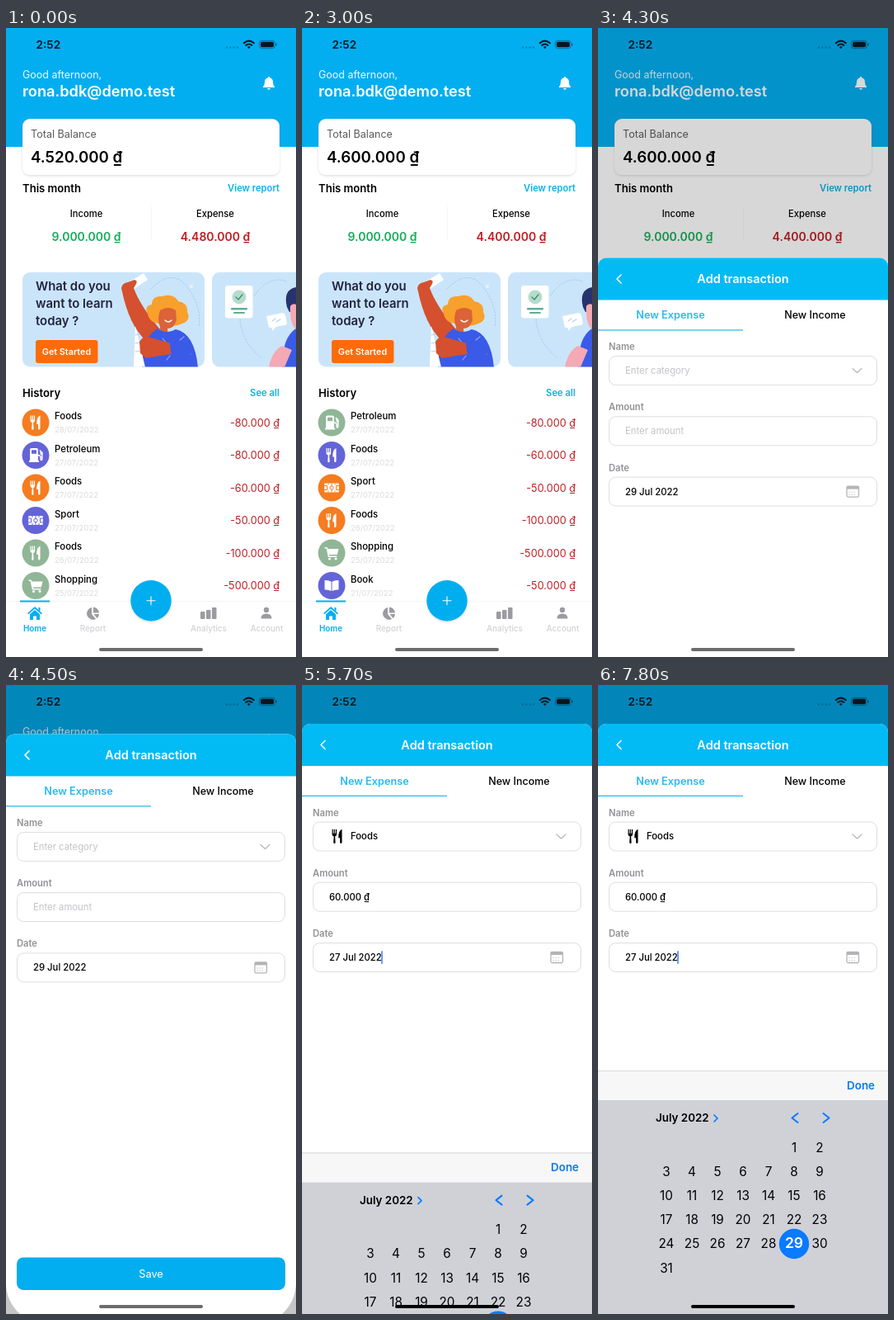
An HTML page for the animation above (8 s loop, 352x762 px).

```html
<!DOCTYPE html>
<html lang="en">
<head>
<meta charset="utf-8">
<title>Expense tracker</title>
<style>
  html, body { margin: 0; width: 100%; height: 100%; overflow: hidden; background: #fff; }
  svg { display: block; width: 352px; height: 762px; font-family: Inter, Roboto, sans-serif; }
</style>
</head>
<body>
<svg id="stage" viewBox="0 0 352 762" xmlns="http://www.w3.org/2000/svg">
  <defs>
    <filter id="soft" x="-30%" y="-30%" width="160%" height="170%">
      <feDropShadow dx="0" dy="1.2" stdDeviation="1.5" flood-opacity=".14"/>
    </filter>
    <clipPath id="card1"><rect x="20" y="296" width="221" height="114.500" rx="9"/></clipPath>
    <clipPath id="card2"><rect x="250" y="296" width="221" height="114.500" rx="9"/></clipPath>

    <!-- icons are centred on 0,0 and take the current colour -->
    <g id="food" fill="currentColor">
      <path d="M-6.500-8.500h1.200v5h1v-5h1.200v5h1v-5h1.200v6q0 2-2 2.600l.5 7.200q0 1.500-1.200 1.500t-1.200-1.500l.5-7.200q-2.200-.6-2.200-2.600z"/>
      <path d="M5.500-8.500V7.200q0 1.400-1.200 1.400T3.100 7.200V2H1.200Q1-7 5.500-8.500z"/>
    </g>
    <g id="fuel" fill="currentColor">
      <path fill-rule="evenodd" d="M-7-6.500q0-2 2-2h6q2 0 2 2V6.500h1v2H-8v-2h1zM-5-6.300v4.600H1v-4.600z"/>
      <path d="M3 0q3 0 3 2.500V5q0 1 .9 1t.9-1V-2.500L5-6" fill="none" stroke="currentColor" stroke-width="1.500"/>
      <rect x="5.500" y="-4.500" width="2.800" height="4" rx="1"/>
    </g>
    <g id="sport">
      <rect x="-8.800" y="-5.500" width="17.600" height="11" rx="1" fill="currentColor"/>
      <g fill="none" stroke="var(--hole)" stroke-width="1">
        <path d="M0-5.500v3.300M0 2.200v3.300M-8.800-2.500h3.300v5h-3.300M8.800-2.500H5.500v5h3.300"/>
        <circle r="2.200"/>
        <path d="M-4-5.500v2M4-5.500v2M-4 5.500v-2M4 5.500v-2"/>
      </g>
    </g>
    <g id="cart" fill="currentColor">
      <path d="M-8.500-7h3l.7 2H8.500L6.800 2H-3l.3 1.500h9V5h-10.500L-6.500-5.500h-2z"/>
      <circle cx="-2.500" cy="7" r="1.600"/><circle cx="5" cy="7" r="1.600"/>
    </g>
    <g id="book" fill="currentColor">
      <path d="M-.5-4.800Q-4-7-8.500-6.500v11.500q4.500-.3 8 1.500zM.5-4.800Q4-7 8.500-6.500v11.500q-4.500-.3-8 1.500z"/>
    </g>
  </defs>

  <g id="home"></g>
  <rect id="dim" width="352" height="762" opacity="0"/>
  <g id="sheet"></g>
  <g id="picker"></g>
  <g id="status"></g>
  <rect id="bar" x="113" y="751" width="126" height="4" rx="2"/>
</svg>

<script>
const $ = id => document.getElementById(id);
const BLUE = '#03aef0', LINK = '#0fb0e6', IOS = '#0a7aff', RED = '#be1e22';

const text = (x, y, s, size, fill = '#000', weight = 400, anchor = 'start') =>
  `<text x="${x}" y="${y}" font-size="${size}" fill="${fill}" font-weight="${weight}" text-anchor="${anchor}">${s}</text>`;
const mid = (x, y, s, size, fill, weight) => text(x, y, s, size, fill, weight, 'middle');
const end = (x, y, s, size, fill, weight) => text(x, y, s, size, fill, weight, 'end');
const rect = (x, y, w, h, fill, rx = 0, extra = '') =>
  `<rect x="${x}" y="${y}" width="${w}" height="${h}" fill="${fill}" rx="${rx}" ${extra}/>`;
const path = (d, fill, extra = '') => `<path d="${d}" fill="${fill}" ${extra}/>`;
const line = (d, stroke, width = 1.5, extra = '') =>
  path(d, 'none', `stroke="${stroke}" stroke-width="${width}" stroke-linecap="round" stroke-linejoin="round" ${extra}`);
const circle = (x, y, r, fill, extra = '') => `<circle cx="${x}" cy="${y}" r="${r}" fill="${fill}" ${extra}/>`;
const icon = (id, x, y, color, hole = '#000') =>
  `<use href="#${id}" x="${x}" y="${y}" style="color:${color};--hole:${hole}"/>`;

// ---- history rows ----
const ROW_Y = 458.3, ROW_H = 39.5;
const ORANGE = '#f57c20', PURPLE = '#6464d9', GREEN = '#90b697';
const before = [
  ['food', 'Foods', '28', 80, ORANGE], ['fuel', 'Petroleum', '27', 80, PURPLE],
  ['food', 'Foods', '27', 60, ORANGE], ['sport', 'Sport', '27', 50, PURPLE],
  ['food', 'Foods', '26', 100, GREEN], ['cart', 'Shopping', '25', 500, GREEN]
];
const after = [
  ['fuel', 'Petroleum', '27', 80, GREEN], ['food', 'Foods', '27', 60, PURPLE],
  ['sport', 'Sport', '27', 50, ORANGE], ['food', 'Foods', '26', 100, ORANGE],
  ['cart', 'Shopping', '25', 500, GREEN], ['book', 'Book', '21', 50, PURPLE]
];
const row = ([kind, name, day, sum, color], i, list) => {
  const y = ROW_Y + i * ROW_H;
  return `<g id="${list}${i}">` + circle(36, y + 19.7, 16.5, color) + icon(kind, 36, y + 19.7, '#fff', color) +
    text(59, y + 15.8, name, 11.4, '#000', 500) + text(59, y + 31.7, day + '/07/2022', 9.6, '#dcdcde') +
    end(332, y + 24.6, `-${sum}.000 ₫`, 12.7, RED) + '</g>';
};
const state = (id, rows, balance, expense) => `<g id="${id}">` +
  text(30, 163, balance + ' ₫', 18.7, '#000', 600) +
  mid(254, 258, expense + ' ₫', 14, RED, 600) +
  rows.map((r, i) => row(r, i, id)).join('') + '</g>';

// ---- banners ----
const SKIN = '#d4502f', SHIRT = '#3a5ae8', SKY = '#cae5fa', DASH = '#9cc4ea';
const learnBanner = `<g clip-path="url(#card1)">` +
  rect(20, 296, 221, 115, SKY) +
  line('M176 316q26-26 44-2t14 48', DASH, .8, 'stroke-dasharray="2 2"') +
  circle(225, 313, 2, '#e6f3fd') +
  path('M141 313l26-16 5 8-26 17z', '#fff') +
  path('M140 315q1-6 8-7l8-3q4 1 2 5l-3 5q8 22 32 50l-12 18q-22-16-32-55z', SKIN) +
  path('M172 346q-5-9 5-11 0-11 13-10 13-4 19 6 12 2 11 13 5 10-6 14-12 6-20 0-20 2-22-12z', '#f8a02c') +
  path('M187 342q10-6 19 0l1 12q-3 10-11 10l1 10h-11l1-12q-4-8 0-20z', '#dc6238') +
  line('M193 354q4 4 8 0', '#fff', 1.3) +
  path('M165 411q0-36 19-47 11 8 22 1 23 5 27 46z', SHIRT) +
  line('M190 376l4 5M211 378l5-4M219 392l5 3M199 397l-4 5M207 388l4-4', '#8da3ff', 1.2) +
  path('M157 361l12 50h-14z', '#fff') +
  line('M157 372l4-1M157 382l6-1M157 392l9-1', '#a9bfdc', .8) +
  path('M162 380q4-7 10-6l28 8q7 8 0 13l-30 5-7-6z', SKIN) +
  path('M199 382q18-3 24 8t-22 8z', SHIRT) +
  ['What do you', 'want to learn', 'today ?'].map((s, i) => text(36, 317.5 + 21.3 * i, s, 14.9, '#22223f', 600)).join('') +
  rect(36, 378, 75.5, 28, '#ff6b08', 3) + mid(73.5, 396, 'Get Started', 10.8, '#fff', 600) + '</g>';

const nextBanner = `<g clip-path="url(#card2)">` +
  rect(250, 296, 221, 115, SKY) +
  line('M301 325q18-26 40-18M284 353q3 30 27 47', DASH, .8, 'stroke-dasharray="2 2"') +
  rect(266, 312, 33.5, 39.5, '#fff', 3) + circle(283, 326, 8.5, '#b6dccb') +
  line('M279 326l3 3 5-6', '#3a9277', 1.4) + rect(273, 339, 20, 2.5, '#5fae93', 1) + rect(276, 344, 14, 2, '#5fae93', 1) +
  path('M316 349l20-4q2 0 3 3l2 9q0 3-3 3l-10 2-5 5v-4l-4 0z', '#fff') +
  line('M323 355l4-3M328 356l5-3', DASH, 1) +
  path('M341 338q-5-21 11-24v30h-8z', '#26336e') +
  path('M345 337q3-4 7-2v30q-8-6-7-28z', '#f4a9b4') +
  path('M335 411q0-36 17-47v47z', SHIRT) +
  path('M319 411q4-20 16-26l12 5-9 21z', '#f4a9b4') + '</g>';

// ---- tab bar ----
const tab = (x, label, on) => mid(x, 730.8, label, 9.9, on ? BLUE : '#d2d2d6', on ? 600 : 500);
const tabs = rect(0, 694, 352, 68, '#fff') + rect(0, 694, 352, .6, '#efeff0') + rect(17, 693.5, 36, 2, BLUE) +
  path('M35 701l9 8-1.200 1.300L35 703.500l-7.800 6.800L26 709zM29 710.300l6-5.200 6 5.200V717h-4v-4.500h-4V717h-4z', BLUE) +
  rect(39.5, 702, 2, 4, BLUE) +
  path('M104 702v8l5 6a7.500 7.500 0 1 1-5-14z', '#9b9ba0') +
  path('M106 701.500a7.500 7.500 0 0 1 7 7h-7zM106.500 710h6.500a7 7 0 0 1-2.500 5z', '#9b9ba0') +
  [[236, 9], [243, 11], [250, 14]].map(([x, h]) => rect(x, 716 - h, 5.5, h, '#9b9ba0', 1)).join('') +
  circle(316, 705, 3.2, '#9b9ba0') + path('M309.500 715.500q0-6 6.500-6t6.500 6z', '#9b9ba0') +
  tab(35, 'Home', true) + tab(105.5, 'Report') + tab(246, 'Analytics') + tab(316.5, 'Account') +
  circle(176, 693.8, 24.7, BLUE, 'filter="url(#soft)"') + line('M171 693.800h10M176 688.800v10', '#fff', 1.1);

$('home').innerHTML = rect(0, 0, 352, 762, '#fff') + rect(0, 0, 352, 144, BLUE) +
  text(20, 61.3, 'Good afternoon,', 12.5, '#e9f8ff') +
  text(20, 83.2, 'rona.bdk@demo.test', 18.2, '#fff', 600) +
  path('M319 59q1.200 0 1.200 1.200 3.800 1 3.800 5.300 0 4 2 5.500v1h-14v-1q2-1.500 2-5.500 0-4.300 3.800-5.300Q317.800 59 319 59zM317 73h4q-.3 1.800-2 1.800T317 73z', '#fff') +
  rect(20, 110, 312, 68, '#fff', 9, 'filter="url(#soft)"') +
  text(30, 132.6, 'Total Balance', 12.6, '#5a5a5c') +
  text(20, 199, 'This month', 13.1, '#000', 600) + end(332, 198.3, 'View report', 11.2, LINK, 600) +
  rect(176, 216, .8, 42, '#f4f4f5') +
  mid(97.5, 229, 'Income', 11.2, '#000', 500) + mid(254, 229, 'Expense', 11.2, '#000', 500) +
  mid(97.5, 258, '9.000.000 ₫', 14, '#17ac58', 600) +
  learnBanner + nextBanner +
  text(20, 446.6, 'History', 13.2, '#000', 600) + end(332, 446, 'See all', 11.3, LINK, 600) +
  state('a', before, '4.520.000', '4.480.000') + state('b', after, '4.600.000', '4.400.000') +
  `<g id="actions"><g id="edit">${rect(0, 0, 130, ROW_H, '#c6c6cb')}${mid(30.5, 24.2, 'Edit', 12.3, '#fff', 500)}</g>` +
  `<g id="del">${rect(0, 0, 70, ROW_H, '#ff3b30')}${mid(30.5, 24.2, 'Delete', 12.1, '#fff', 500)}</g></g>` +
  tabs;

// ---- add transaction sheet ----
const field = (y, label) => text(13, y - 7, label, 11.2, '#929297', 600) +
  rect(13.5, y + .5, 325, 35, '#fff', 8, 'stroke="#dddde0"');
const value = (y, s, x = 33) => text(x, y, s, 11.3, '#000', 500);
const hint = (y, s) => text(33, y, s, 11.3, '#c3c3c8');

$('sheet').innerHTML =
  path('M0 10a10 10 0 0 1 10-10h332a10 10 0 0 1 10 10v655a50 50 0 0 1-50 50H50a50 50 0 0 1-50-50z', '#fff') +
  path('M0 51V10a10 10 0 0 1 10-10h332a10 10 0 0 1 10 10v41z', '#02bbf5') +
  line('M28 20.500l-5 5 5 5', '#fff', 1.5) + mid(176, 30.6, 'Add transaction', 14.5, '#fff', 600) +
  mid(88, 73.6, 'New Expense', 12.7, '#27bbef', 600) + mid(263.5, 73.6, 'New Income', 12.5, '#000', 500) +
  rect(0, 86.8, 176, 1.2, '#27b5e8') +
  field(118.5, 'Name') + field(191.7, 'Amount') + field(265, 'Date') +
  line('M309 134l5.500 5 5.500-5', '#b9b9be', 1.3) +
  rect(302, 276.5, 14.5, 13, 'none', 1.5, 'stroke="#b4b4b8" stroke-width="1.300"') + rect(302, 276.5, 14.5, 3.5, '#b4b4b8') +
  line('M305 283.500h9M305 286.500h9', '#b4b4b8', 1.2, 'stroke-dasharray=".1 2.900"') +
  `<g id="empty">${hint(140.4, 'Enter category')}${hint(213.4, 'Enter amount')}${value(287, '29 Jul 2022')}</g>` +
  `<g id="filled">${icon('food', 43, 136.3, '#000')}${value(140.4, 'Foods', 59)}${value(213.8, '60.000 ₫')}${value(287, '27 Jul 2022')}` +
  rect(96.3, 275, 1.4, 16, '#2f6bff', .7, 'id="caret"') + '</g>' +
  rect(13, 634, 326, 39.5, BLUE, 8) + mid(176, 658.6, 'Save', 12.8, '#fff', 400);

// ---- date picker ----
const day = n => {
  const cell = n + 4, x = 83 + 31 * (cell % 7), y = 92.8 + 29.2 * Math.floor(cell / 7), today = n === 29;
  return (today ? circle(x, y + .4, 18.2, IOS) : '') +
    mid(x, y + 5.8, n, today ? 17.5 : 15.3, today ? '#fff' : '#000', today ? 600 : 400);
};
$('picker').innerHTML = rect(0, 0, 352, 296, '#cfd1d7') + rect(0, 0, 352, 36, '#f7f7f8') + rect(0, 0, 352, .8, '#d3d3d6') +
  end(336, 22.7, 'Done', 13.4, '#0a7aea', 600) +
  text(70, 62, 'July 2022', 13.4, '#000', 600) +
  line('M141 54l4 4-4 4', IOS, 1.7) + line('M242.500 52l-7 5.500 7 5.500M273.500 52l7 5.500-7 5.500', IOS, 2) +
  Array.from({ length: 31 }, (_, i) => day(i + 1)).join('');

// ---- status bar ----
const INK = '#06161f';
$('status').innerHTML = text(36.5, 25, '2:52', 13.6, INK, 600) +
  [268, 272.3, 276.6, 280.9].map(x => circle(x, 23.5, 1.2, INK, 'opacity=".250"')).join('') +
  line('M288.800 18.300q6-5.300 12 0', INK, 2) + line('M291.200 21q3.600-3 7.200 0', INK, 2) + path('M292.800 23q2-1.600 4 0l-2 2.200z', INK) +
  rect(307.5, 15.3, 19, 9.4, 'none', 3, `stroke="${INK}" opacity=".4"`) + rect(309, 16.8, 16, 6.4, INK, 1.8) +
  rect(327.6, 18.5, 1.3, 3, INK, .6, 'opacity=".5"');

// ---- motion ----
const LOOP = 8000, RELOAD = 2000, CUT = 5600, OPEN = 122;

// What is left of a critically damped spring's way at time t
const left = (t, start, speed) => {
  const x = Math.max(0, t - start) / 1000 * speed;
  return (1 + x) * Math.exp(-x);
};
const ramp = (t, a, b) => Math.min(1, Math.max(0, (t - a) / (b - a)));
const show = (id, on) => $(id).setAttribute('visibility', on ? 'inherit' : 'hidden');
const move = (id, x, y) => $(id).setAttribute('transform', `translate(${x.toFixed(2)} ${y.toFixed(2)})`);

function caretOpacity(t) {
  if (t < 6000) return 1;
  const p = t % 1000;
  return 1 - ramp(p, 100, 300) + ramp(p, 400, 600);
}

function draw(t) {
  const first = OPEN * (1 - left(t, 650, 11.5)) * left(t, 1600, 11.5);
  const second = OPEN * (1 - left(t, 3250, 11.5));
  const onSecond = t > 2800, shift = onSecond ? second : first;

  show('a', t < RELOAD);
  show('b', t >= RELOAD);
  move('a0', -first, 0);
  move('b0', onSecond ? 0 : -first, 0);
  move('b1', -second, 0);
  show('actions', shift > .3);
  move('actions', 0, ROW_Y + (onSecond ? ROW_H : 0));
  move('edit', 352 - shift, 0);
  move('del', 352 - shift / 2, 0);

  const away = left(t, 4174, 18.35);
  move('sheet', 0, 47 + 715 * away);
  $('dim').setAttribute('opacity', .23 * (1 - away));
  show('empty', t < CUT);
  show('filled', t >= CUT);
  $('caret').setAttribute('opacity', caretOpacity(t));

  move('picker', 0, 467 + 296 * left(t, 5577, 18.35));
  $('bar').setAttribute('fill', t < CUT ? '#6c6c6e' : '#000');
}

const begin = performance.now();
(function tick() {
  draw((performance.now() - begin) % LOOP);
  requestAnimationFrame(tick);
})();
</script>
</body>
</html>
```
